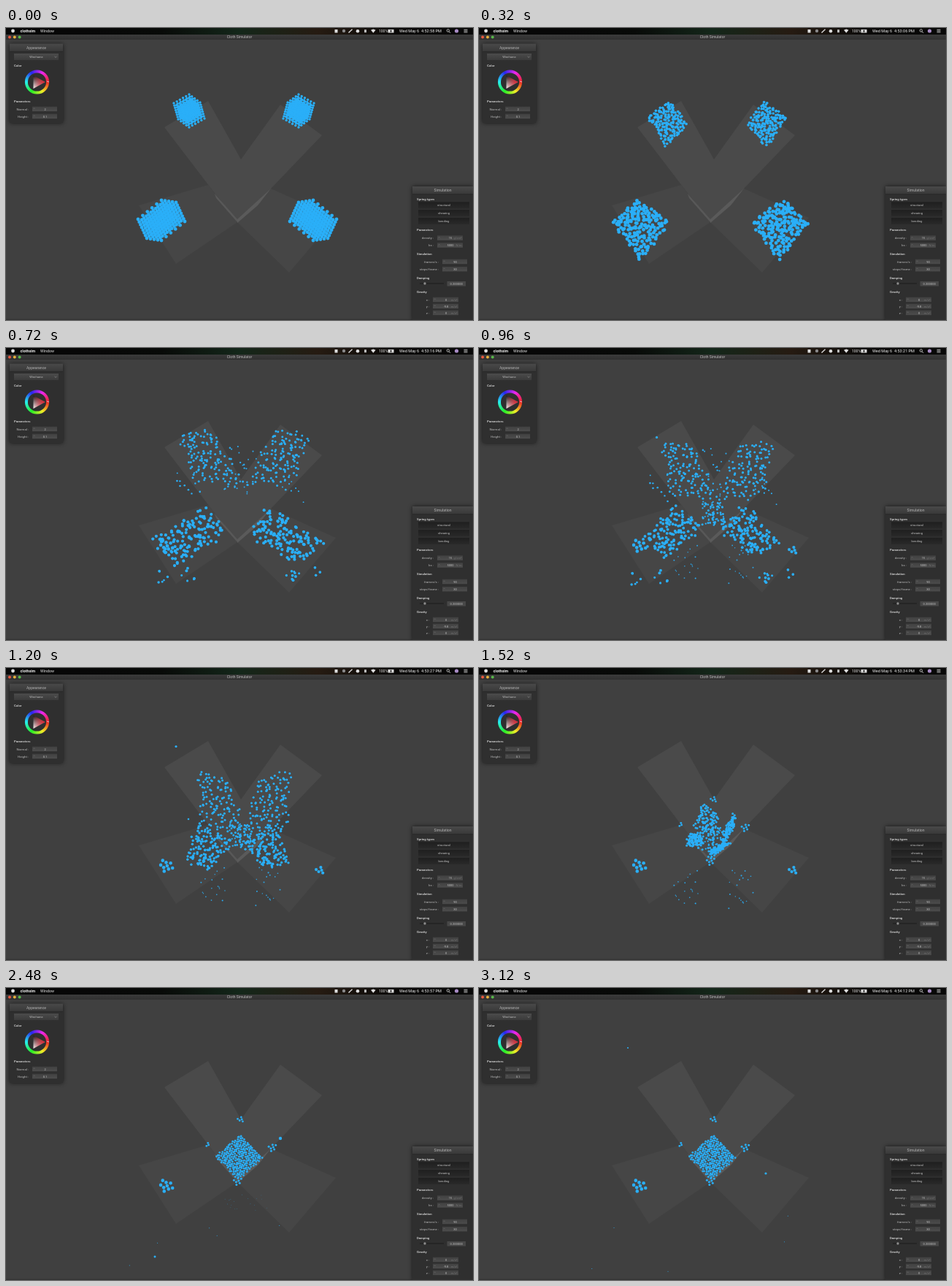
An HTML page with a canvas that plays this animation: 640x400 px, repeating every 3.2 s.

```html
<!DOCTYPE html>
<html>
<head>
<meta charset="utf-8">
<style>
html, body { margin: 0; width: 100%; height: 100%; overflow: hidden; background: #404040; }
canvas { display: block; }
</style>
</head>
<body>
<canvas id="stage" width="640" height="400"></canvas>
<script>
const ctx = document.getElementById('stage').getContext('2d');
const BLUE = '#2aaff8', FONT = 'Roboto, Inter, sans-serif';
const LOOP = 3200, STEP = 80, PER_CUBE = 240;
const fract = v => v - Math.floor(v);
const rnd = n => fract(Math.sin(n * 127.1 + 3.7) * 43758.5453);
const mix = (a, b, t) => a + (b - a) * t;

// ---- drawing helpers ----
function rect(x, y, w, h, fill) {
  ctx.fillStyle = fill;
  ctx.fillRect(x, y, w, h);
}
function shade(x, y, w, h, top, bottom) {
  const g = ctx.createLinearGradient(0, y, 0, y + h);
  g.addColorStop(0, top);
  g.addColorStop(1, bottom);
  rect(x, y, w, h, g);
}
function dot(x, y, r, fill = BLUE) {
  ctx.fillStyle = fill;
  ctx.beginPath();
  ctx.arc(x, y, r, 0, 7);
  ctx.fill();
}
function ring(x, y, r, width, color) {
  ctx.strokeStyle = color;
  ctx.lineWidth = width;
  ctx.beginPath();
  ctx.arc(x, y, r, 0, 7);
  ctx.stroke();
}
function poly(fill, ...p) {
  ctx.fillStyle = fill;
  ctx.beginPath();
  for (let i = 0; i < p.length; i += 2) ctx.lineTo(p[i], p[i + 1]);
  ctx.fill();
}
function line(color, width, ...p) {
  ctx.strokeStyle = color;
  ctx.lineWidth = width;
  ctx.beginPath();
  for (let i = 0; i < p.length; i += 2) ctx.lineTo(p[i], p[i + 1]);
  ctx.stroke();
}
function text(s, x, y, size, color, align = 'left', weight = 400) {
  ctx.font = `${weight} ${size}px ${FONT}`;
  ctx.textAlign = align;
  ctx.fillStyle = color;
  ctx.fillText(s, x, y);
}

// ---- fluid particles ----
// Left side only, upper then lower; the right side is mirrored
const axes = [326, 317];
// Start cubes: corner and three edge vectors
const cubes = [
  [230, 103, 21, -12, 15, 11, 6, 22],
  [181, 262, 32, -26, 20, 3, 12, 26]
];
// Later regions: corners in the order 00, 10, 11, 01
const regions = [
  [[230, 122, 262, 100, 286, 132, 257, 162], [182, 266, 216, 236, 264, 266, 222, 318]],
  [[237, 121, 282, 112, 327, 188, 262, 182], [199, 265, 272, 220, 304, 253, 235, 297]],
  [[262, 140, 306, 155, 328, 230, 270, 222], [248, 266, 262, 213, 314, 238, 280, 274]]
];
const keys = [0, 4, 9, 15, 23, 31, 39];
const counts = [240, 175, 135, 130, 85, 62, 62];
const spread = [0, 4, 12, 9, 5, 1.2, 1.2];
const upperSize = [1.7, 1.8, 1.5, 1.5, 1.5, 1.4, 1.4];
const lowerSize = [2.4, 2.4, 2.1, 1.7, 1.5, 1.4, 1.4];

function bilinear(q, a, b) {
  return [0, 1].map(i => mix(mix(q[i], q[i + 2], a), mix(q[i + 6], q[i + 4], a), b));
}
function pool(right, low, a, b) {
  const s = (right + a) / 2, t = (low + b) / 2;
  return [321 + 31 * s - 34 * t, 201 + 32 * s + 30 * t];
}
function makeCube(c) {
  const right = c % 2, low = c >> 1;
  const side = ([x, y]) => [right ? 2 * axes[low] - x : x, y];
  const pts = Array.from({ length: PER_CUBE }, (_, n) => ({
    n, a: fract(.5 + n * .7548777), b: fract(.5 + n * .5698403),
    jx: rnd(n + c * 300) - .5, jy: rnd(n + c * 300 + 1500) - .5,
    size: low ? lowerSize : upperSize
  })).sort((p, q) => p.a - q.a);
  const [x, y, ux, uy, vx, vy, wx, wy] = cubes[low];
  for (let i = 0; i < 6; i++) {
    pts.slice(i * 40, i * 40 + 40).sort((p, q) => p.b - q.b).forEach((p, m) => {
      const u = i / 5, v = m % 5 / 4, w = Math.floor(m / 5) / 7;
      const poses = [side([x + ux * u + vx * v + wx * w, y + uy * u + vy * v + wy * w])];
      for (const r of regions) poses.push(side(bilinear(r[low], p.a, p.b)));
      for (let k = 0; k < 3; k++) poses.push(pool(right, low, p.a, p.b));
      p.poses = poses.map(([px, py], k) => [px + p.jx * spread[k], py + p.jy * spread[k]]);
    });
  }
  return pts;
}
const fluid = [0, 1, 2, 3].flatMap(makeCube);

function drawFluid(f) {
  let k = 0;
  while (k < 5 && f >= keys[k + 1]) k++;
  let t = (f - keys[k]) / (keys[k + 1] - keys[k]);
  if (k > 2) t = 1 - (1 - t) ** 2;
  const shown = mix(counts[k], counts[k + 1], t);
  for (const { n, poses, size } of fluid) {
    if (n >= shown) continue;
    const a = poses[k], b = poses[k + 1];
    dot(mix(a[0], b[0], t), mix(a[1], b[1], t), mix(size[k], size[k + 1], t));
  }
}

// Loose drops, scattered in a box and its mirror image:
// x, y, width, height, count per side, first frame, last frame, radius
const bands = [
  [234, 168, 32, 44, 10, 6, 12, 1.2],
  [298, 125, 30, 75, 14, 6, 12, 1.1],
  [206, 300, 52, 22, 12, 6, 12, 1.7],
  [306, 214, 16, 32, 35, 12, 19, 1.3],
  [266, 272, 34, 54, 19, 11, 19, .9],
  [276, 280, 36, 36, 26, 20, 28, .55],
  [284, 285, 36, 22, 9, 29, 37, .4]
];
function drawBands(f) {
  bands.forEach(([x, y, w, h, n, from, to, r], b) => {
    if (f < from || f > to) return;
    ctx.globalAlpha = Math.min(1, .4 + r / 2);
    const fall = f - (from + to) / 2;
    for (let i = 0; i < 2 * n; i++) {
      const seed = b * 211 + i, px = x + w * rnd(seed);
      dot(i % 2 ? 642 - px : px, y + h * rnd(seed + 5000) + fall, r * (.8 + .4 * rnd(seed + 9000)));
    }
    ctx.globalAlpha = 1;
  });
}

// Clumps that stick: x, y, count, gap, radius, first frame, last frame
const clumps = [
  [219, 271, 9, 3.4, 2.3, 9, 39],
  [431, 277, 5, 2.9, 2.1, 10, 26],
  [322, 180, 5, 2.2, 1.4, 17, 39],
  [276.5, 215, 3, 2, 1.4, 17, 39],
  [365, 218, 7, 2.4, 1.5, 17, 39],
  [317.5, 264, 8, 2.5, 1.5, 17, 39]
];
// Stray drops flying outward: frame, x, y, radius
const strays = [
  [15, 233, 107.5, 1.6], [15, 250, 207, 1.3],
  [23, 222, 203, 1.5], [23, 241, 222, 1], [23, 423, 237, .8], [23, 278, 363, .9], [23, 291, 369, .9],
  [31, 376, 206, 2.2], [31, 204, 368, 1.5],
  [39, 204, 82, 1], [39, 393, 254, 1.6]
];
function drawLoose(f) {
  for (const [x, y, n, gap, r, from, to] of clumps) {
    if (f < from || f > to) continue;
    for (let i = 0; i < n; i++) {
      const d = gap * Math.sqrt(i + .3);
      dot(x + d * Math.cos(i * 2.4), y + d * .9 * Math.sin(i * 2.4), r);
    }
  }
  for (const [at, x, y, r] of strays) {
    const d = f - at, speed = .04 * d;
    if (Math.abs(d) < 4) dot(x + (x - 321) * speed, y + (y - 232) * speed, r);
  }
  // tiny specks along the bottom
  for (let i = 0; f > 20 && i < 5; i++) {
    const seed = (f >> 2) * 5 + i;
    dot(150 + 320 * rnd(seed), 300 + 90 * rnd(seed + 700) + f % 4 * 2, .5);
  }
  const d = f - 23;
  if (d > -4 && d < 3) {
    ctx.fillStyle = BLUE;
    ctx.beginPath();
    ctx.ellipse(148.5 - 14 * d, 168.5 - 6 * d, 5.6 + d, 4 + d * .7, .2, 0, 7);
    ctx.fill();
  }
}

// ---- scenery and interface ----
function drawPlanes() {
  poly('#464646', 182, 243, 277, 215, 317, 266, 233, 323);
  poly('#464646', 363, 220, 452, 260, 388, 335, 317, 266);
  poly('#4a4a4a', 217, 136, 277, 100, 322, 180, 376, 105, 433, 147, 362, 221, 317, 264, 285, 225);
  poly('#585858', 286, 227, 317, 262, 317, 266, 288, 233);
  poly('#5a5a5a', 363, 220, 345, 243, 317, 267, 317, 262);
}
function drawMenu(f) {
  const g = ctx.createLinearGradient(0, 0, 640, 0);
  ['#070707', '#070707', '#080a08', '#14271a', '#261b12', '#0a0908', '#080808']
    .forEach((color, i) => g.addColorStop(i / 6, color));
  rect(0, 0, 640, 9, g);
  dot(9.5, 4, 2.4, '#ddd');
  text('clothsim', 19.5, 5.9, 5.3, '#f2f2f2', 'left', 700);
  text('Window', 47, 5.9, 5.3, '#e8e8e8');
  rect(450.5, 2, 4, 4.5, '#ddd');
  dot(463, 4, 2.2, '#888');
  line('#ddd', 1.4, 469.5, 6.5, 474.5, 1.8);
  dot(482, 4.2, 2.3, '#ddd');
  rect(491, 2.2, 3, 4, '#bbb');
  poly('#ddd', 500, 2.8, 503.3, 1.6, 506.6, 2.8, 503.3, 6.8);
  text('100%', 511, 5.9, 5, '#eee');
  rect(523.5, 2, 8, 4.5, '#ddd');
  rect(526.5, 2.8, 2, 2.8, '#333');
  const s = 178 + (f < 10 ? 2 * f : Math.floor(18 + (f - 9) * 56 / 30));
  const clock = `4:${50 + Math.floor(s / 60)}:${String(s % 60).padStart(2, '0')}`;
  text(`Wed May 6  ${clock} PM`, 539, 5.9, 5.55, '#eee');
  ring(605.8, 3.5, 1.7, .8, '#ddd');
  line('#ddd', .9, 607, 4.8, 609, 6.8);
  dot(617.5, 4, 2.6, '#a78bc4');
  for (let y = 2.3; y < 7; y += 1.8) line('#ddd', .8, 627.5, y, 632.5, y);

  shade(0, 9, 640, 7, '#3b3b3b', '#303030');
  ['#e9593f', '#e6ae3b', '#58b74a'].forEach((color, i) => dot(5 + i * 6.8, 12.5, 2, color));
  text('Cloth Simulator', 320, 14.4, 5, '#bcbcbc', 'center');
}
function panel(x, y, w, h, title) {
  ctx.shadowColor = '#000a';
  ctx.shadowBlur = 6;
  rect(x, y, w, h, '#2f2f2f');
  ctx.shadowBlur = 0;
  shade(x, y, w, 10.5, '#494949', '#393939');
  line('#222', .6, x, y + 10.8, x + w, y + 10.8);
  text(title, x + w / 2, y + 7.1, 5.1, '#b4b4b4', 'center');
}
const heading = (s, x, y) => text(s, x, y, 4.3, '#c8c8c8', 'left', 700);
function field(name, x, y, w, value, unit = '') {
  text(name + ' :', x - 5, y + 4.8, 4.4, '#bdbdbd', 'right');
  shade(x, y, w, 6.4, '#414141', '#4c4c4c');
  line('#777', .5, x + 1.5, y + 3.2, x + 2.6, y + 2, x + 3.7, y + 3.2);
  text(unit, x + w - 1.5, y + 4.8, 4, '#6e6e6e', 'right');
  text(value, x + w / 2 + .5, y + 4.8, 4, '#c4c4c4', 'center');
}
function drawAppearance() {
  panel(5, 21.5, 73, 108.5, 'Appearance');
  shade(11, 35, 61, 9, '#4b4b4b', '#3b3b3b');
  text('Wireframe', 41.5, 41.1, 4, '#bdbdbd', 'center');
  line('#999', .6, 66.5, 39, 68, 40.4, 69.5, 39);
  heading('Color', 11, 53);
  const wheel = ctx.createConicGradient(0, 42.5, 74);
  for (let h = 0; h <= 360; h += 30) wheel.addColorStop(h / 360, `hsl(${h}, 85%, 54%)`);
  ring(42.5, 74, 14.6, 4, wheel);
  const tone = ctx.createLinearGradient(37, 65, 37, 83);
  tone.addColorStop(0, '#111');
  tone.addColorStop(1, '#fff');
  const red = ctx.createLinearGradient(37, 0, 53, 0);
  red.addColorStop(0, '#e0203000');
  red.addColorStop(1, '#e02030');
  for (const fill of [tone, red]) poly(fill, 53.5, 74, 37.5, 65, 37.5, 83);
  line('#ddd', .8, 56, 73, 59, 74);
  heading('Parameters', 11, 101.5);
  field('Normal', 36, 107.7, 34, '2');
  field('Height', 36, 117.7, 34, '0.1');
}
function drawSimulation() {
  panel(557, 217, 83, 184, 'Simulation');
  heading('Spring types', 563, 235.5);
  ['structural', 'shearing', 'bending'].forEach((s, i) => {
    const y = 238.3 + i * 10.8;
    shade(565, y, 70, 9, '#1f1f1f', '#292929');
    text(s, 600, y + 6, 4.2, '#c4c4c4', 'center');
  });
  heading('Parameters', 563, 278);
  field('density', 591, 284.3, 35, '15', 'g/cm²');
  field('ks', 591, 294.3, 35, '5000', 'N/m');
  heading('Simulation', 563, 311);
  field('frames/s', 598, 316.8, 34, '90');
  field('steps/frame', 598, 327, 34, '30');
  heading('Damping', 563, 343.5);
  line('#1d1d1d', 1.2, 567, 350, 600, 350);
  dot(574, 350, 1.7, '#8c8c8c');
  rect(604.5, 347, 25.5, 6.6, '#484848');
  text('0.200000', 617.2, 351.8, 4.1, '#c4c4c4', 'center');
  heading('Gravity', 563, 362.5);
  ['0', '-9.8', '0'].forEach((value, i) => field('xyz'[i], 585, 368.8 + i * 9, 35, value, 'm/s²'));
}

function frame() {
  const f = Math.floor(performance.now() % LOOP / STEP);
  rect(0, 0, 640, 400, '#404040');
  drawPlanes();
  drawBands(f);
  drawFluid(f);
  drawLoose(f);
  rect(0, 398.6, 640, 1.4, '#343434');
  drawMenu(f);
  drawAppearance();
  drawSimulation();
  requestAnimationFrame(frame);
}
frame();
</script>
</body>
</html>
```
